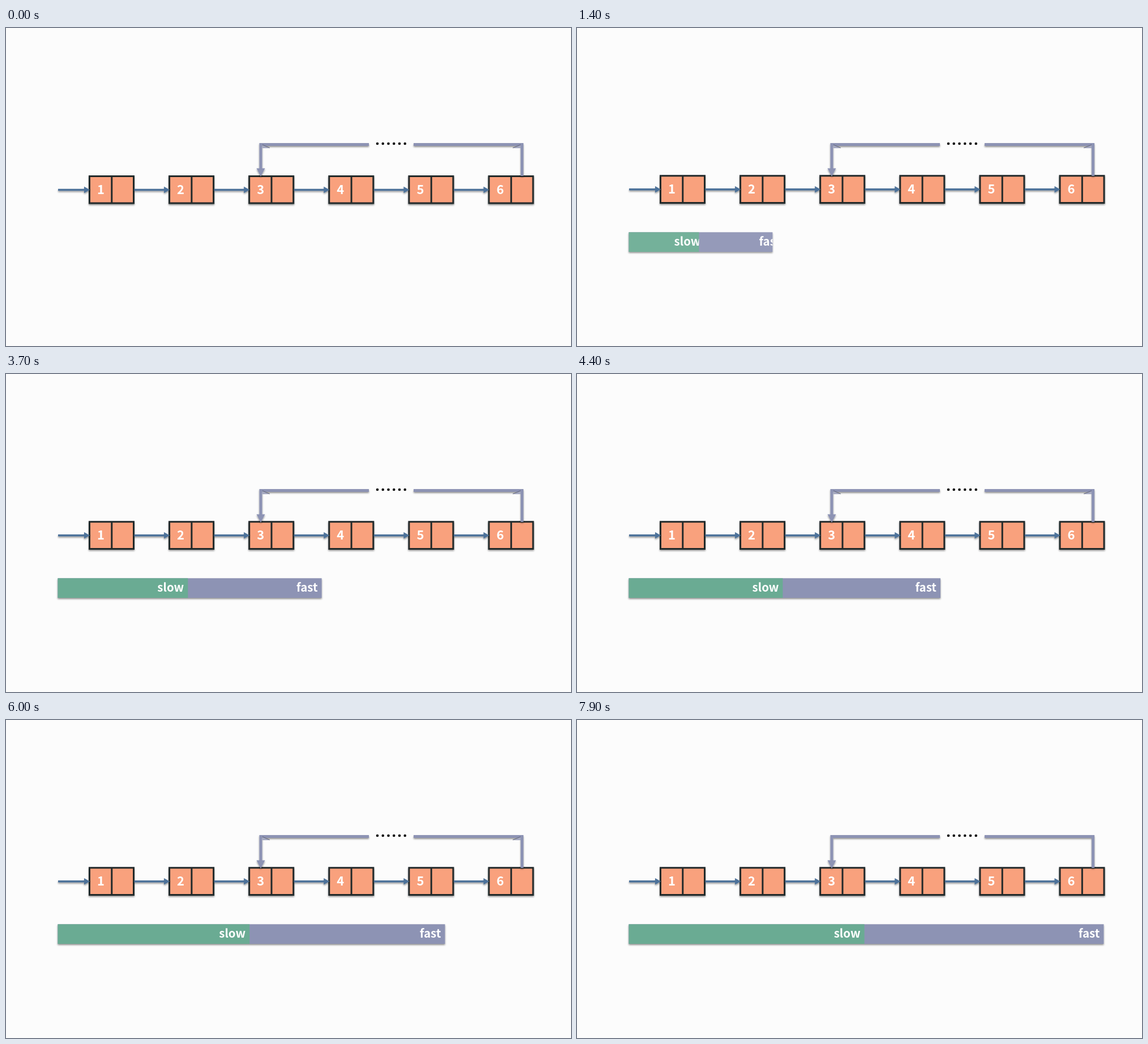
These frames come from a looping animation (998x561 px, 8 s). An HTML page:

```html
<!DOCTYPE html>
<html lang="en">
<head>
<meta charset="utf-8">
<title>Slow and fast pointers</title>
<style>
  html, body { margin: 0; width: 100%; height: 100%; overflow: hidden; background: #fcfcfc; }
  svg { display: block; width: 998px; height: 561px; }
  text { font-family: "Noto Sans CJK SC", "Noto Sans CJK", "Noto Sans", sans-serif; font-weight: 700; fill: #fff; }
  .box { fill: #f9a17d; stroke: #23292c; stroke-width: 3; }
  .loop { fill: none; stroke: #8d93b4; stroke-width: 5; }
</style>
</head>
<body>
<svg viewBox="0 0 998 561">
  <defs>
    <filter id="shadow" filterUnits="userSpaceOnUse" x="0" y="150" width="998" height="300">
      <feDropShadow dx="0" dy="2" stdDeviation="1.5" flood-color="#000" flood-opacity=".42"/>
    </filter>
    <clipPath id="fastClip"><rect id="fastWipe" x="91.5" y="350" height="35"/></clipPath>
    <clipPath id="slowClip"><rect id="slowWipe" x="91.5" y="350" height="35"/></clipPath>
  </defs>
  <rect width="998" height="561" fill="#fcfcfc"/>
  <g id="list">
    <g id="boxes" filter="url(#shadow)"></g>
    <g id="digits" font-size="22" text-anchor="middle"></g>
    <g id="arrows" filter="url(#shadow)"></g>
  </g>
  <g filter="url(#shadow)">
    <path class="loop" d="M641 205.5H450V250M720 205.5H911.5V261"/>
    <path d="M442.5 247.5H457.5L450 262Z" fill="#8d93b4"/>
  </g>
  <g id="corners">
    <path d="M453 206L466 212H453ZM909 206L895 212H909Z" fill="#a5a9c0"/>
    <path d="M453 206L466 211.5M909 206L895 211.5" fill="none" stroke="#555a70" stroke-width=".9"/>
  </g>
  <g id="dots"></g>
  <g id="bars">
    <g filter="url(#shadow)">
      <rect id="fastBar" x="91.5" y="360.3" height="34.7" fill="#8d93b4"/>
      <rect id="slowBar" x="91.5" y="360.3" height="34.7" fill="#6aab93"/>
    </g>
    <g font-size="20.5" text-anchor="end">
      <g clip-path="url(#fastClip)"><text id="fastText" y="384">fast</text></g>
      <g clip-path="url(#slowClip)"><text id="slowText" y="384">slow</text></g>
    </g>
  </g>
</svg>
<script>
const LOOP = 8000, STEP = 100, LEFT = 91.5, PITCH = 141.1;
const el = id => document.getElementById(id);

function add(parent, name, attrs, text) {
  const node = document.createElementNS("http://www.w3.org/2000/svg", name);
  for (const key in attrs) node.setAttribute(key, attrs[key]);
  if (text) node.textContent = text;
  el(parent).append(node);
}

function addArrow(from, to) {
  add("arrows", "path", {
    d: `M${from} 283H${to - 10}V279L${to} 284.7L${to - 10} 290.5V286.5H${from}Z`, fill: "#4d729a"
  });
}

addArrow(92, 148);
for (let i = 0; i < 6; i++) {
  const x = 147.5 + i * PITCH;
  add("boxes", "path", { class: "box", d: `M${x} 260.8h78v47.6h-78zM${x + 39.3} 260.8v47.6` });
  add("digits", "text", { x: x + 20, y: 292 }, String(i + 1));
  if (i < 5) addArrow(x + 79, x + PITCH + 0.5);
  add("dots", "circle", { cx: 656 + i * 9.75, cy: 204, r: 2.3, fill: "#080808" });
}

const clamp = u => Math.max(0, Math.min(1, u));

// Quick start, long settle.
const ease = u => u < 0.3 ? u * u / 0.3 : 1 - (1 - u) ** 2 / 0.7;
const move = (t, start) => ease(clamp((t - start) / 2000));

function setBar(name, right, wipe) {
  const width = (right - LEFT) * wipe;
  el(name + "Bar").setAttribute("width", width);
  el(name + "Wipe").setAttribute("width", width);
  el(name + "Text").setAttribute("x", right - 7);
}

function draw(t) {
  const steps = move(t, 2648) + move(t, 5240);
  const wipe = clamp((t - 290) / 1200);
  setBar("slow", 225.5 + steps * PITCH, wipe);
  setBar("fast", 366 + steps * 2 * PITCH, wipe);
  el("bars").setAttribute("opacity", wipe);
  el("list").setAttribute("transform", `translate(0 ${0.7 * (1 - clamp(t / 800))})`);
  el("corners").setAttribute("visibility", t < 7300 ? "visible" : "hidden");
}

function tick() {
  draw(Math.floor(performance.now() % LOOP / STEP) * STEP);
  requestAnimationFrame(tick);
}
tick();
</script>
</body>
</html>
```
